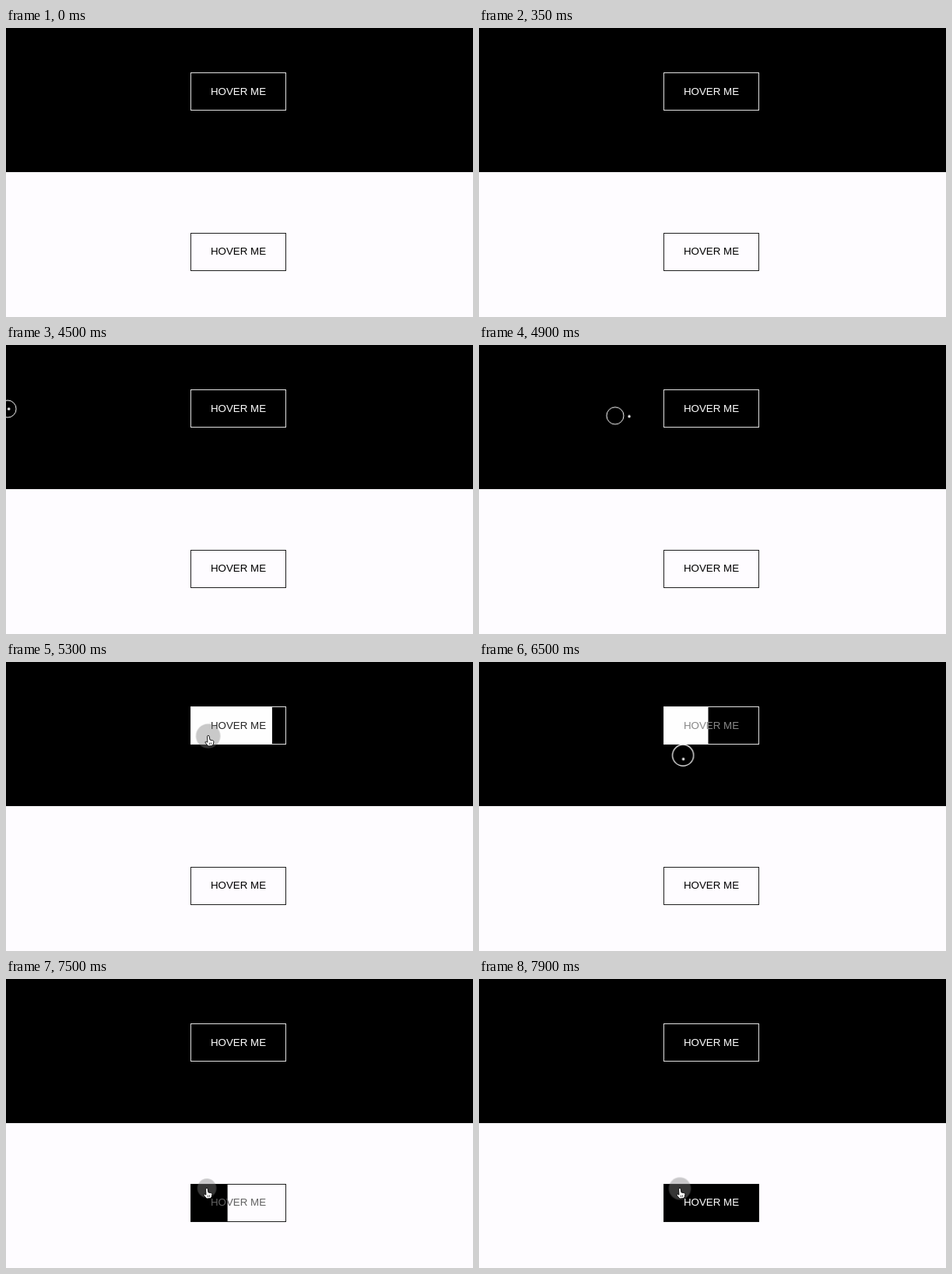
Animation, 600 px wide and 371 px high, one loop 8000 ms. Source, as an HTML page:

```html
<!DOCTYPE html>
<html lang="en">
<head>
<meta charset="utf-8">
<title>Hover buttons</title>
<style>
  html, body { margin: 0; width: 100%; height: 100%; overflow: hidden; background: #000; }
  svg { display: block; width: 600px; height: 371px; }
  text { font: 13.333px "Liberation Sans", Arial, sans-serif; text-anchor: middle; }
  .frame { fill: none; stroke-opacity: .88; }
</style>
</head>
<body>
<svg viewBox="0 0 600 371">
  <rect width="600" height="371" fill="#000"/>
  <rect y="185" width="600" height="186" fill="#fefcff"/>

  <g>
    <rect id="fillTop" x="237.5" y="57.5" width="0" height="48" fill="#fefefe"/>
    <rect class="frame" x="237.5" y="57.5" width="122" height="48" stroke="#fff"/>
    <text id="textTop" x="298.5" y="85.7" fill="#fff">HOVER ME</text>
  </g>
  <g>
    <rect id="fillLow" x="237.5" y="263.5" width="0" height="48" fill="#000"/>
    <rect class="frame" x="237.5" y="263.5" width="122" height="48" stroke="#000"/>
    <text id="textLow" x="298.5" y="291" fill="#000">HOVER ME</text>
  </g>

  <g id="trail"><circle id="ring" r="11"/></g>
  <g id="mouse">
    <circle id="dot" r="1.7"/>
    <g id="hand" fill="#fff" stroke="#000" stroke-width=".9" stroke-linejoin="round">
      <path d="M-1.4.8a1.3 1.3 0 0 1 2.6-.2L2 5l3.4.6q1.6.4 1.5 2L6.3 10.4 5 12.6-.2 13-3.6 9q-1-1.4.2-1.8 1-.3 2.3 1Z"/>
      <path d="M1.3 8.6l.3 2.4M3.4 8.4l.2 2.4" fill="none" stroke-width=".7"/>
    </g>
  </g>
</svg>
<script>
const LOOP = 8000, FRAME = 50, LAG = 36, FADE = 500;
const CROSS = 6920;
const top_ = { enter: 5020, leave: 6345 };
const low = { enter: 7380 };
const anims = [];

// rows: [time, properties, easing]; the ends of the loop are padded
function play(id, rows, easing = 'linear') {
  const all = [[0, rows[0][1]], ...rows, [LOOP, rows[rows.length - 1][1]]];
  const keys = all.map(([t, props, ease]) => ({ offset: t / LOOP, easing: ease || easing, ...props }));
  const anim = document.getElementById(id).animate(keys, { duration: LOOP, iterations: Infinity });
  anim.pause();
  anims.push(anim);
}

// the pointer glides in, rests, visits the upper button, then the lower one
const at = (x, y) => ({ transform: `translate(${x}px, ${y}px)` });
const path = [
  [3800, at(-14, 79)],
  [4060, at(2, 82)],
  [4450, at(2, 82), 'cubic-bezier(.45, 0, .3, 1)'],
  [5300, at(260, 95)],
  [6250, at(260, 95), 'cubic-bezier(.4, .3, .7, .7)'],
  [6900, at(267.5, 182), 'cubic-bezier(.4, .3, .6, 1)'],
  [7500, at(258, 269)]
];
play('mouse', path);
play('trail', path.map(([t, ...rest]) => [t + LAG, ...rest]));

// eased change from a to b on entering a button, and back on leaving
const sweep = ({ enter, leave }, a, b) => [
  [enter, a, 'ease'], [enter + FADE, b],
  ...(leave ? [[leave, b, 'ease'], [leave + FADE, a]] : [])
];
const scale = s => ({ transform: `scale(${s})` });
play('ring', [...sweep(top_, scale(1), scale(1.5)), ...sweep(low, scale(1), scale(1.3))]);

function paint(name, hover, off, on) {
  play('fill' + name, sweep(hover, { width: '0px' }, { width: '122px' }));
  play('text' + name, sweep(hover, { fill: off }, { fill: on }));
}
paint('Top', top_, '#fff', '#000');
paint('Low', low, '#000', '#fff');

// outlined ring and dot in the open, grey disc and hand over a button
const modes = [[0, '#fff'], [top_.enter], [top_.leave, '#fff'], [CROSS, '#000'], [low.enter]];
const switchBy = (id, look) => play(id, modes.map(([t, color]) => [t, look(color)]), 'step-end');
switchBy('ring', color => color
  ? { stroke: color, fill: 'transparent' }
  : { stroke: 'transparent', fill: 'rgba(128, 128, 128, .42)' });
switchBy('dot', color => ({ fill: color || 'transparent' }));
switchBy('hand', color => ({ opacity: color ? 0 : 1 }));

const start = performance.now();
function tick() {
  const t = (performance.now() - start) % LOOP;
  const now = Math.floor(t / FRAME) * FRAME;
  for (const anim of anims) anim.currentTime = now;
  requestAnimationFrame(tick);
}
tick();
</script>
</body>
</html>
```
